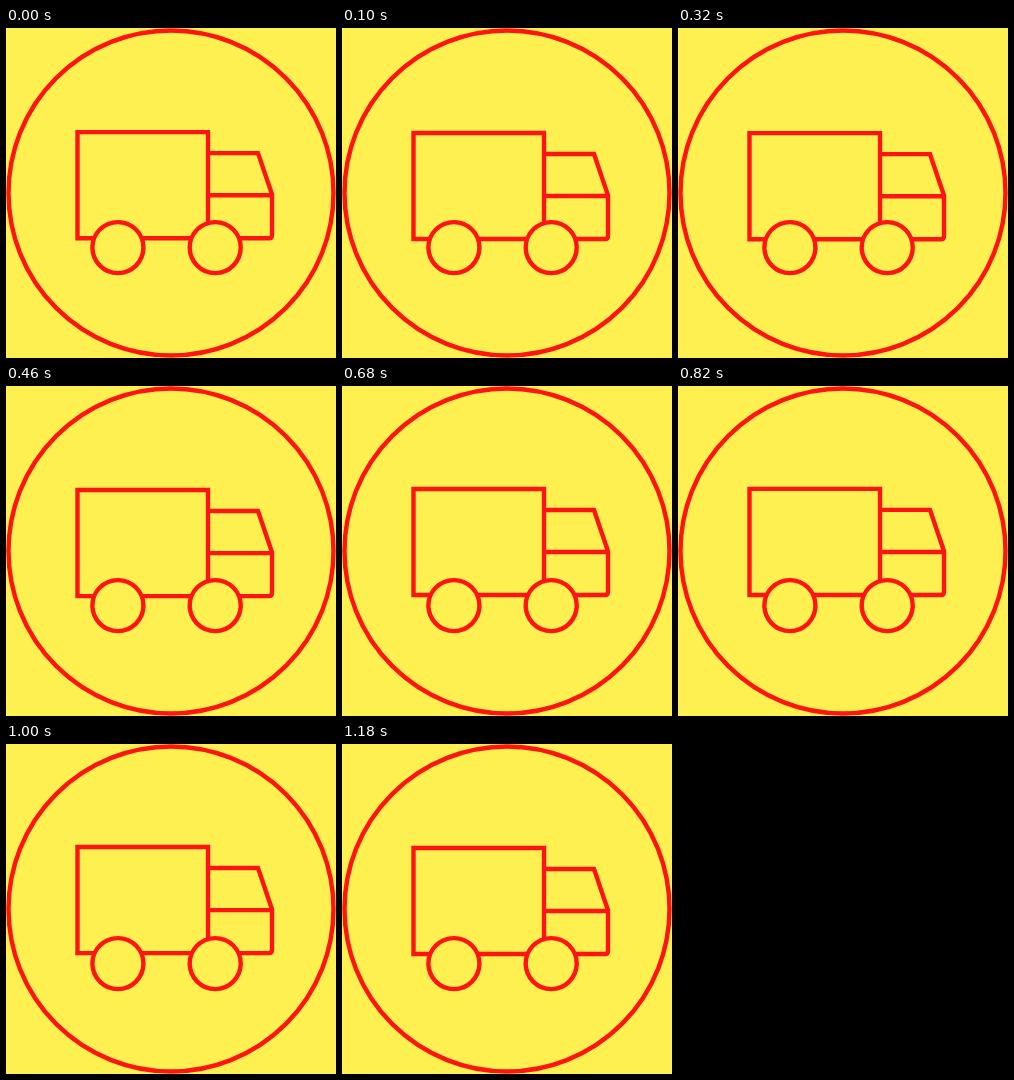
An HTML page that plays this animation: 330x330 px, repeating every 1200 ms.

```html
<!DOCTYPE html>
<html lang="en">
<head>
<meta charset="utf-8">
<title>Idling truck</title>
<style>
  html, body { margin: 0; height: 100%; overflow: hidden; background: #fff052; }
  svg { display: block; width: 100%; height: 100%; }
</style>
</head>
<body>
<svg viewBox="0 0 330 330" fill="#fff052" stroke="#ff1414" stroke-width="4.4">
  <circle cx="165" cy="165" r="162.5"/>
  <g id="body">
    <path d="M202 125.2H252L266 166.5V207Q266 210.3 262.7 210.3H202M202 167.3H266"/>
    <path d="M71.5 104.2H202V210.3H71.5Z"/>
  </g>
  <circle cx="111.9" cy="219.6" r="25.5"/>
  <circle cx="209.2" cy="219.6" r="25.5"/>
</svg>
<script>
  const PERIOD = 1200, LOWEST_AT = 228, SWING = 1.28, CENTER = -0.34;
  const truckBody = document.getElementById('body');
  const start = performance.now();

  function draw() {
    const t = (performance.now() - start) % PERIOD;
    const phase = 2 * Math.PI * (t - LOWEST_AT) / PERIOD;
    // The second harmonic makes the body linger at the top of its bounce.
    const y = CENTER + SWING * (Math.cos(phase) + Math.cos(2 * phase) / 4);
    truckBody.setAttribute('transform', `translate(0 ${y.toFixed(3)})`);
    requestAnimationFrame(draw);
  }
  draw();
</script>
</body>
</html>
```
